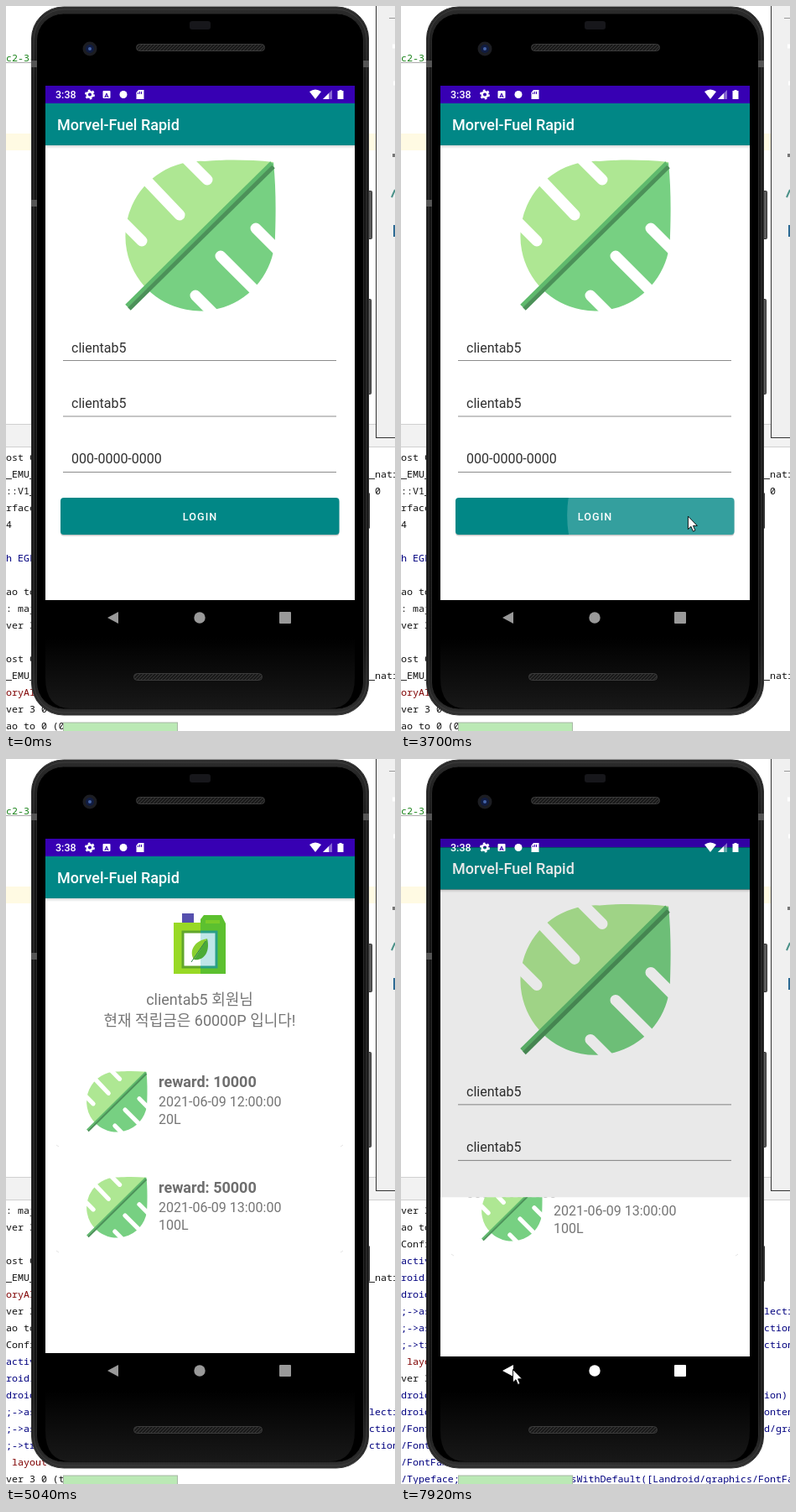
Animation of 464x864 px, one loop 8000 ms. Source, as an HTML page:

```html
<!DOCTYPE html>
<html lang="ko">
<head>
<meta charset="utf-8">
<title>Phone login</title>
<style>
html, body { margin: 0; width: 100%; height: 100%; overflow: hidden; background: #fff; }
svg { display: block; font-family: Roboto, "Noto Sans CJK KR", "Noto Sans CJK", sans-serif; }
.mono { font: 11.65px "Noto Sans Mono", monospace; }
.mono text { white-space: pre; }
.field { font-size: 16px; fill: #303030; }
.title { font-size: 18px; font-weight: 500; fill: #fff; }
.grey { fill: #757575; font-size: 16px; }
.large { font-size: 18px; }
.strong { font-size: 18px; font-weight: 700; fill: #6e6e6e; }
.mid { text-anchor: middle; }
</style>
</head>
<body>
<svg width="464" height="864" viewBox="0 0 464 864">
  <defs>
    <clipPath id="logArea"><rect y="526" width="464" height="338"/></clipPath>
    <clipPath id="screen"><rect x="47" y="95" width="369" height="656"/></clipPath>
    <clipPath id="reveal"><rect id="revealBox" x="47" y="95" width="369" height="656"/></clipPath>
    <clipPath id="buttonArea"><rect x="65" y="586" width="332.5" height="44" rx="4"/></clipPath>
    <linearGradient id="body" x2="0" y2="1">
      <stop stop-color="#2c2c2c"/><stop offset=".1" stop-color="#151515"/>
      <stop offset=".9" stop-color="#131313"/><stop offset="1" stop-color="#303030"/>
    </linearGradient>
    <linearGradient id="chin" x2="0" y2="1">
      <stop stop-color="#000"/><stop offset="1" stop-color="#181818"/>
    </linearGradient>
    <linearGradient id="barShadow" x2="0" y2="1">
      <stop stop-color="#000" stop-opacity=".16"/><stop offset="1" stop-color="#000" stop-opacity="0"/>
    </linearGradient>
    <pattern id="mesh" width="4" height="4" patternUnits="userSpaceOnUse">
      <rect width="4" height="4" fill="#1b1b1b"/><path d="M0 4L4 0" stroke="#3a3a3a"/>
    </pattern>

    <g id="leaf">
      <path fill="#aee793" d="M319 186C290 183 260 183 237 185A89.500 89.500 0 0 0 169 338Z"/>
      <path fill="#77d082" d="M319 186C322 215 322 245 321 274A89.500 89.500 0 0 1 169 338Z"/>
      <path stroke="#fff" stroke-width="13" stroke-linecap="round"
        d="M207 249L166 206M240 207L210 177M162 280L138 256M298 265L326 293M256 298L302 344M226 345L250 369"/>
      <path stroke="#5fba6d" stroke-width="5" d="M144 357.500L317 187"/>
      <path stroke="#4c9159" stroke-width="5" d="M147 361L319 191.500"/>
    </g>

    <g id="window">
      <rect x="47" y="95" width="369" height="21" fill="#3700b3"/>
      <rect x="47" y="166" width="369" height="542" fill="#fff"/>
      <rect x="47" y="116" width="369" height="50" fill="#018786"/>
      <rect x="47" y="166" width="369" height="4" fill="url(#barShadow)"/>
      <rect x="47" y="708" width="369" height="43"/>
      <text class="title" x="61" y="148">Morvel-Fuel Rapid</text>
    </g>

    <g id="can">
      <rect x="210" y="184" width="14" height="12" fill="#5650ae"/>
      <path fill="#98d925" d="M200 195H232V256H200Z"/>
      <path fill="#5cc02f" d="M232 191L236 186H257L262 196V256H232Z"/>
      <path fill="#98d925" d="M238 192H255V196H238Z" opacity=".5"/>
      <path fill="#fff" d="M212 207H232V247H212Z"/>
      <path fill="#bfe6e8" d="M232 207H250V247H232Z"/>
      <path fill="none" stroke="#61a62c" stroke-width="3" d="M232 206H211V248H232"/>
      <path fill="none" stroke="#2a9f86" stroke-width="3" d="M232 206H251V248H232"/>
      <path fill="#8ad02f" d="M240 214C224 217 218 229 224 239Z"/>
      <path fill="#4bab36" d="M240 214C244 231 235 241 224 239Z"/>
      <path stroke="#2b7f45" d="M221 242L238 217"/>
    </g>
  </defs>

  <rect width="464" height="864" fill="#fff"/>
  <rect y="152" width="464" height="20" fill="#fffae3"/>
  <text class="mono" y="66" fill="#1b841b">c2-3-</text>
  <path d="M0 67.500H32" stroke="#aaa"/>
  <rect y="498" width="464" height="28" fill="#f2f2f2"/>
  <path d="M0 498.500H464M0 525.500H464" stroke="#d0d0d0"/>
  <g clip-path="url(#logArea)"><g id="log" class="mono"></g></g>
  <rect x="68.500" y="854" width="136" height="14" fill="#bbe9b5" stroke="#a8b8a6"/>

  <rect x="441.500" y="-1" width="30" height="515.500" fill="#f0f0f0" stroke="#333"/>
  <path d="M457 14.500H464" stroke="#999"/>
  <path d="M461 48H464M462 92H464" stroke="#fff" stroke-width="5"/>
  <path d="M461 178H464" stroke="#777" stroke-width="4"/>
  <path d="M460 228L464 219" stroke="#4a9188" stroke-width="2"/>
  <rect x="462" y="261" width="2" height="14" fill="#2d6a94"/>

  <g fill="#5c5c5c" stroke="#333">
    <rect x="431" y="220.500" width="5.500" height="57" rx="1"/>
    <rect x="431" y="349.500" width="4.500" height="113" rx="1"/>
    <rect x="430" y="581" width="3.500" height="41"/>
  </g>
  <rect x="30.500" y="1" width="402" height="844" rx="38" fill="url(#body)" stroke="#333"/>
  <rect x="33" y="4" width="397" height="838" rx="36" fill="none" stroke="#3c3c3c"/>
  <rect x="36.500" y="9" width="390" height="829" rx="32" stroke="#292929"/>
  <path d="M47 752H416V800Q416 837 386 837H77Q47 837 47 800Z" fill="url(#chin)"/>
  <path d="M30 69H37M30 235H37M426 69H433" stroke="#555" stroke-width="8"/>
  <rect x="219" y="18" width="25" height="10" rx="3" fill="#17171b"/>
  <circle cx="100" cy="51" r="8.500" fill="#1c1d22"/>
  <circle cx="100" cy="51" r="5" fill="#111c40"/>
  <circle cx="100" cy="51" r="2" fill="#4463a7"/>
  <rect x="155.500" y="45.500" width="153" height="8" rx="4" fill="url(#mesh)" stroke="#3b3b3b"/>
  <rect x="152.500" y="795.500" width="153" height="8" rx="4" fill="url(#mesh)" stroke="#3b3b3b"/>

  <g clip-path="url(#screen)">
    <rect x="47" y="95" width="369" height="656"/>
    <g id="login">
      <use href="#window"/>
      <use href="#leaf"/>
      <g class="field">
        <text x="78" y="412.500">clientab5</text>
        <text x="78" y="479">clientab5</text>
        <text x="78" y="545">000-0000-0000</text>
      </g>
      <path d="M68 422.500H394M68 489H394M68 555.500H394" stroke="#8c8c8c"/>
      <rect x="65" y="587.500" width="332.500" height="44" rx="4" fill="#000" opacity=".22"/>
      <rect x="65" y="586" width="332.500" height="44" rx="4" fill="#018786"/>
      <g clip-path="url(#buttonArea)"><circle id="tap" cx="341" cy="607" fill="#fff"/></g>
      <text class="mid" x="231.500" y="613" font-size="12.600" font-weight="500" letter-spacing="1.100" fill="#fff">LOGIN</text>
      <rect id="dim" x="47" y="95" width="369" height="656"/>
    </g>
    <g id="rewards"><g clip-path="url(#reveal)">
      <use href="#window"/>
      <use href="#can"/>
      <text class="grey large mid" x="231" y="293">clientab5 회원님</text>
      <text class="grey large mid" x="231" y="318">현재 적립금은 60000P 입니다!</text>
      <g id="cards"></g>
    </g></g>

    <g fill="#fff">
      <text x="59" y="110" font-size="12.500" font-weight="500">3:38</text>
      <circle cx="100" cy="105.500" r="3.300" fill="none" stroke="#fff" stroke-width="2.500"/>
      <circle cx="100" cy="105.500" r="5" fill="none" stroke="#fff" stroke-width="2" stroke-dasharray="2.600"/>
      <rect x="115.500" y="101" width="9" height="9" rx="1"/>
      <text class="mid" x="120" y="108.500" font-size="8" font-weight="700" fill="#3700b3">A</text>
      <circle cx="140" cy="105.500" r="4.500"/>
      <path d="M158 100H164.500V111H155.500V103Z"/>
      <path d="M157.500 103V105M159.500 102V105M161.500 102V105" stroke="#3700b3"/>
      <path d="M362 102Q369 97 376 102L369 111Z"/>
      <path d="M378 111L389 100V111Z" opacity=".4"/>
      <path d="M378 111L385 104V111Z"/>
      <path d="M395.500 101H397.500V100H400.500V101H402.500V111H395.500Z"/>
    </g>
    <rect id="navTap" x="83" y="708" width="91" height="43" rx="21.500" fill="#1b1b1b"/>
    <g id="nav"><path d="M121 729L134 722V736Z"/><circle cx="231" cy="729" r="6.700"/><rect x="326" y="722" width="14" height="14" rx="1"/></g>
  </g>
  <path id="cursor" fill="#fff" stroke="#000" stroke-width=".9" d="M.5 .5V16L4 12.700L6.500 18.500L9 17.400L6.600 11.800H11.500Z"/>
</svg>
<script>
const $ = id => document.getElementById(id);
const LOOP = 8000, BLUE = '#00007f', RED = '#7f0000';

// Log rows: text at the left, text showing right of the phone, colour
const logRows = [
  ['ost C'], ['_EMU_', '_native'], ['::V1_', ' 0'], ['rface'], ['4'], [''],
  ['h EGL', '', BLUE], [''], ['ao to'], [': maj'], ['ver 3'], [''],
  ['ost C'], ['_EMU_', '_native'], ['oryAl', '', RED], ['ver 3 0'], ['ao to 0 (0'],
  ['Config 1'], ['activity for token android.os.BinderProxy@a14a142', '', BLUE],
  ['roid/', '', BLUE], ['droid', '', BLUE], [';->as', 'lection', BLUE],
  [';->as', 'ction)', BLUE], [';->tr', 'ction)', BLUE], [' layout', '', RED],
  ['ver 3 0 (t'], ['droid', 'ion) ', BLUE], ['droid', 'ontent', BLUE],
  ['/Font', 'd/grap', BLUE], ['/Font', '', BLUE], ['/FontFam', '', BLUE],
  ['/Typeface;->createFromFamiliesWithDefault([Landroid/graphics/FontFamily', '', BLUE]
];
$('log').innerHTML = logRows.map(([left, right = '', color = '#111'], i) =>
  `<text y="${542 + i * 20}" fill="${color}">${(left.padEnd(62) + right).replace(/>/g, '&gt;')}</text>`).join('');

const card = (dy, reward, hour, litres) => `<g transform="translate(0 ${dy})">
  <use href="#leaf" transform="translate(38.6 297.7) scale(.404)"/>
  <text class="strong" x="182" y="391">reward: ${reward}</text>
  <text class="grey" x="182" y="413.5">2021-06-09 ${hour}:00:00</text>
  <text class="grey" x="182" y="435">${litres}L</text>
  <path d="M60 460l3 2M402 460l-3 2" stroke="#e4e4e4"/></g>`;
$('cards').innerHTML = card(0, 10000, 12, 20) + card(126, 50000, 13, 100);

const bursts = [[100, 510, 5], [1230, 1340, 2], [3190, 3390, 3], [3600, 4320, 8],
  [4630, 5250, 7], [5660, 6170, 6], [7410, 7920, 6]];
function snap(t) {
  let shown = 0;
  for (const [start, end, steps] of bursts) {
    if (t < start) break;
    const step = (end - start) / (steps - 1);
    shown = Math.min(end, start + step * Math.floor((t - start + 10) / step));
  }
  return shown;
}

const pointer = [[0, -60, 880], [100, 27, 842], [410, 386, 640], [510, 336, 615],
  [1229, 336, 615], [1230, 393, 621], [1340, 365, 612], [3189, 365, 612],
  [3190, 385, 624], [3390, 341, 607], [3700, 341, 607], [4120, 475, 690],
  [5640, 475, 668], [5660, 400, 668], [6170, 137, 732], [7410, 137, 732],
  [7510, 133, 727], [LOOP, 133, 727]];
const scrolls = [[0, 0], [3805, 40], [4630, 100], [4730, 180], [5140, 300]];

const progress = (t, start, end) => Math.max(0, Math.min(1, (t - start) / (end - start)));
const mix = (a, b, k) => a + (b - a) * k;

function bezier(x, xs, ys) {
  const at = (p, s) => (1 - s) ** 3 * p[0] + 3 * (1 - s) ** 2 * s * p[1] + 3 * (1 - s) * s * s * p[2] + s ** 3 * p[3];
  let low = 0, high = 1;
  for (let i = 0; i < 24; i++) {
    const s = (low + high) / 2;
    if (at(xs, s) < x) low = s; else high = s;
  }
  return at(ys, low);
}
const fastOut = x => bezier(x, [0, .4, .2, 1], [0, 0, 1, 1]);
const extraSlow = x => x < 1 / 6
  ? bezier(x, [0, .05, .1333, 1 / 6], [0, 0, .06, .4])
  : bezier(x, [1 / 6, .2083, .25, 1], [.4, .82, 1, 1]);

function pointerAt(t) {
  const i = Math.max(1, pointer.findIndex(p => p[0] >= t));
  const [a, b] = [pointer[i - 1], pointer[i]], k = progress(t, a[0], b[0]);
  return [mix(a[1], b[1], k), mix(a[2], b[2], k)];
}
const shift = (id, x, y) => $(id).setAttribute('transform', `translate(${x} ${y})`);

function draw(now) {
  const t = snap(now % LOOP);
  shift('cursor', ...pointerAt(t));
  shift('log', 0, -scrolls.filter(s => s[0] <= t + 5).pop()[1]);

  $('tap').setAttribute('r', mix(0, 340, progress(t, 3560, 3900)));
  $('tap').setAttribute('opacity', .2 * (1 - progress(t, 3850, 4200)));

  // Activity transition: the rewards window is wiped in, later wiped out
  const opening = progress(t, 4615, 5040), closing = progress(t, 7831, 8256);
  const covered = fastOut(opening) - fastOut(closing);
  const hidden = closing ? extraSlow(closing) : 1 - extraSlow(opening);
  const drop = closing ? fastOut(closing) : hidden;
  shift('login', 0, -12.5 * covered);
  $('dim').setAttribute('opacity', .1 * covered);
  shift('rewards', 0, 27 * drop);
  $('rewards').setAttribute('visibility', opening ? 'visible' : 'hidden');
  const cut = 656 * .959 * hidden;
  $('revealBox').setAttribute('y', 95 + cut);
  $('revealBox').setAttribute('height', 656 - cut);

  const level = Math.round(mix(153, 255, progress(t, 7600, 7920)));
  $('nav').setAttribute('fill', `rgb(${level},${level},${level})`);
  $('navTap').setAttribute('opacity', closing ? 0 : progress(t, 7510, 7720));
}

function tick() {
  draw(performance.now());
  requestAnimationFrame(tick);
}
tick();
</script>
</body>
</html>
```
